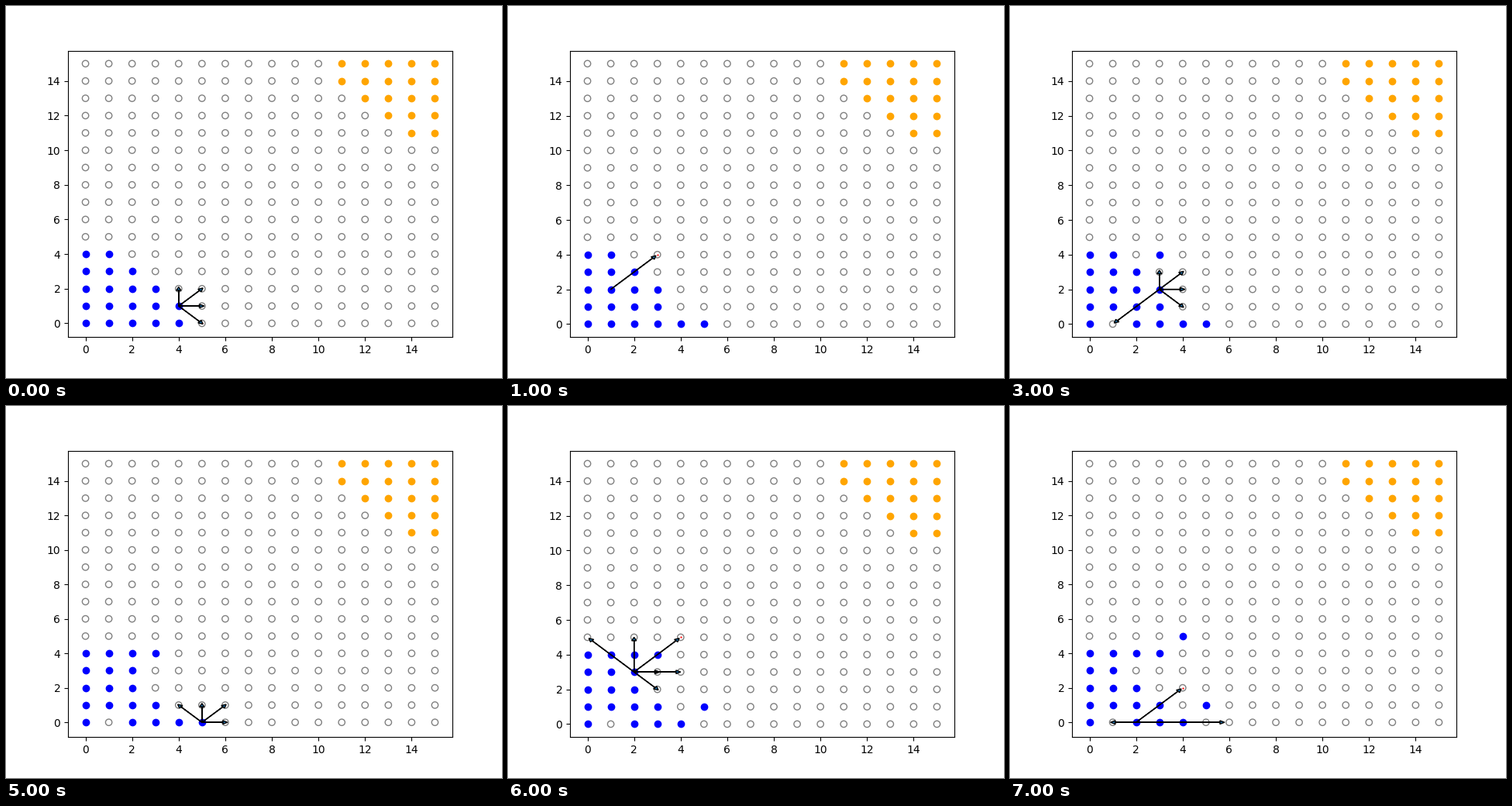
These frames come from a looping animation (640 px wide and 480 px high, 8000 ms). A matplotlib script:

```python
import itertools

import matplotlib.pyplot as plt
from matplotlib.animation import FuncAnimation

SIZE = 16
CAMP = 5
DIRECTIONS = [d for d in itertools.product((-1, 0, 1), repeat=2) if d != (0, 0)]
CELLS = list(itertools.product(range(SIZE), repeat=2))
MOVES = [
    ((4, 1), (5, 0)),
    ((1, 2), (3, 4)),
    ((1, 0), (1, 2)),
    ((3, 2), (3, 3)),
    ((3, 3), (2, 4)),
    ((5, 0), (5, 1)),
    ((2, 3), (4, 5)),
    ((2, 0), (4, 2)),
]

BLUE = {(x, y) for x, y in itertools.product(range(CAMP), repeat=2) if x + y <= CAMP}
ORANGE = {(SIZE - 1 - x, SIZE - 1 - y) for x, y in BLUE}


def shift(cell, direction, steps=1):
    return cell[0] + steps * direction[0], cell[1] + steps * direction[1]


def is_free(cell, taken):
    return all(0 <= c < SIZE for c in cell) and cell not in taken


def targets(start, taken):
    """Single steps plus every cell reachable by a chain of jumps."""
    steps = {shift(start, d) for d in DIRECTIONS}
    jumps, queue = set(), [start]
    while queue:
        cell = queue.pop()
        for d in DIRECTIONS:
            landing = shift(cell, d, 2)
            if shift(cell, d) in taken and is_free(landing, taken) and landing not in jumps:
                jumps.add(landing)
                queue.append(landing)
    return sorted({c for c in steps if is_free(c, taken)} | jumps)


def blue_after(count):
    pieces = set(BLUE)
    for start, end in MOVES[:count]:
        pieces.remove(start)
        pieces.add(end)
    return pieces


def dots(cells, **style):
    ax.scatter(*zip(*sorted(cells)), **style)


def draw(turn):
    ax.clear()
    blue = blue_after(turn)
    taken = blue | ORANGE
    dots(set(CELLS) - taken, facecolors="none", edgecolors="gray")
    dots(blue, color="blue")
    dots(ORANGE, color="orange")

    start, chosen = MOVES[turn]
    dots([chosen], color="red", s=1, linewidths=0.5)
    for x, y in targets(start, taken):
        ax.arrow(*start, 0.9 * (x - start[0]), 0.9 * (y - start[1]),
                 head_width=0.2, head_length=0.2)


fig, ax = plt.subplots(figsize=(6.4, 4.8), dpi=100)
anim = FuncAnimation(fig, draw, frames=len(MOVES), init_func=lambda: None,
                     interval=1000, repeat=True, repeat_delay=0)
plt.show()
```
